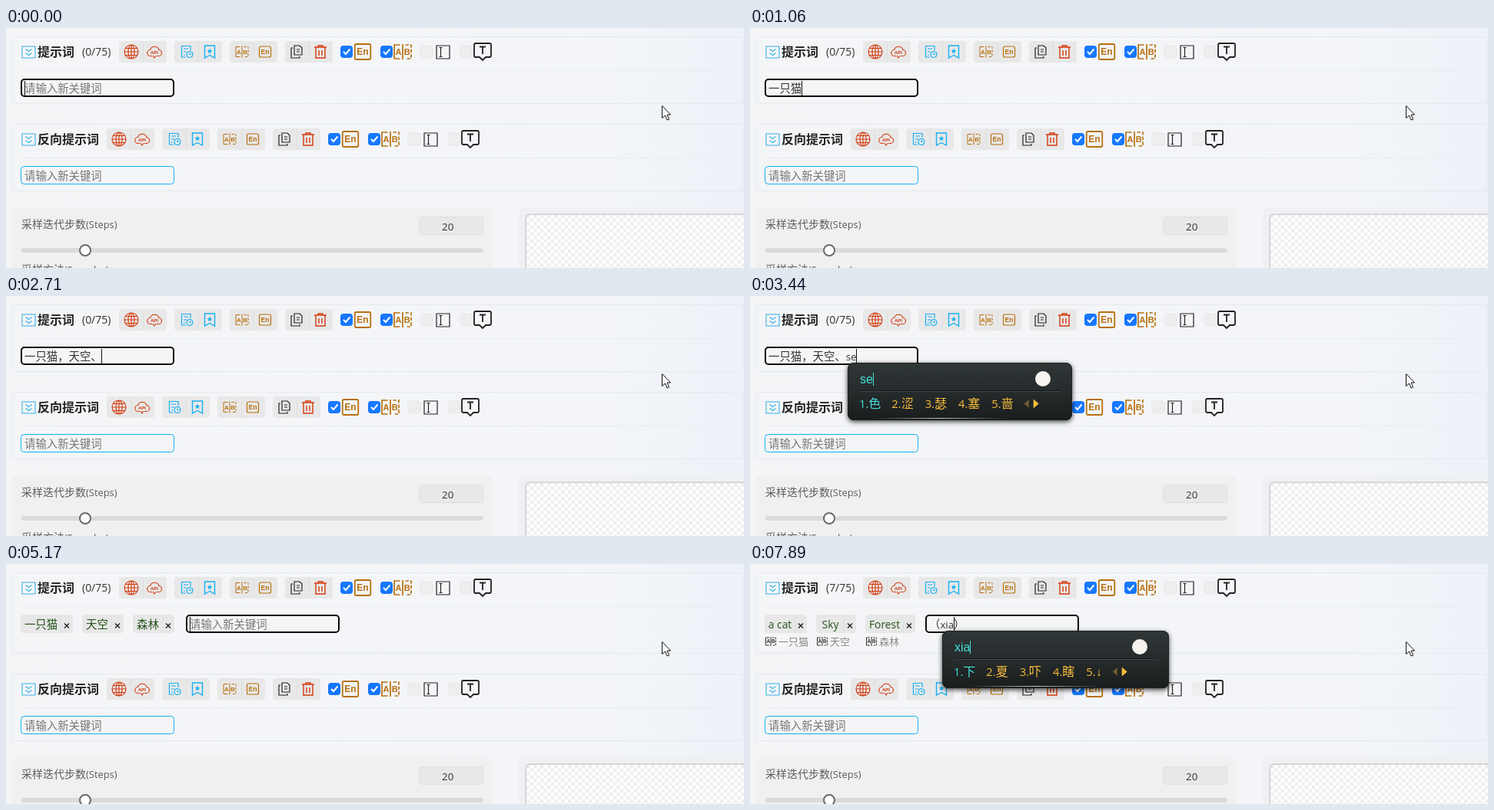
Recreate the animation shown at these times as an HTML page with a canvas. Size 960 by 313 pixels, loop 8 s.

```html
<!DOCTYPE html>
<html lang="zh-CN">
<head>
<meta charset="utf-8">
<style>
html, body { margin: 0; width: 100%; height: 100%; overflow: hidden; background: #f4f5f7; }
canvas { display: block; width: 960px; height: 313px; }
</style>
</head>
<body>
<canvas id="stage" width="960" height="313"></canvas>
<script>
const ctx = document.getElementById('stage').getContext('2d');
const LOOP = 8000, BLINK = 530, ASSIST_DELAY = 400;
const SANS = '"Open Sans", "Liberation Sans", "Noto Sans CJK SC", sans-serif';
const ARIAL = '"Liberation Sans", "Noto Sans CJK SC", sans-serif';
const RED = '#d4380d', BLUE = '#16aff2', BROWN = '#b8700f', INK = '#222', CYAN = '#45e0da', GOLD = '#f6bd3c';
const PLACEHOLDER = '请输入新关键词';

// time, text before the composition, pinyin, candidates, text after the caret
const steps = [
  [0, ''],
  [70, '', 'y', '一 有 要 也 与'],
  [170, '', 'yi', '一 以 已 亿 意'],
  [260, '', "yi'z", '一直 一只 一种 一周 一组'],
  [360, '', "yi'zh", '一直 一只 一种 一周 一张'],
  [460, '', "yi'zhi", '一直 一只 一致 意志 抑制'],
  [660, '', "yi'zhi'm", '一直忙 一只猫 一只马 一直没有 一直买'],
  [760, '', "yi'zhi'ma", '一只马 一直骂 一支马 一直麻烦 一直吗'],
  [860, '', "yi'zhi'mao", '一只猫 一直冒 一支猫 一直冒泡 一只毛'],
  [1060, '一只猫'],
  [1320, '一只猫，'],
  [1520, '一只猫，', 't', '他 她 听 天 太'],
  [1590, '一只猫，', 'ti', '提 题 体 替 踢'],
  [1690, '一只猫，', 'tia', '天 条 跳 填 挑'],
  [1790, '一只猫，', 'tian', '天 田 填 甜 添'],
  [1910, '一只猫，', "tian'k", '天空 天卡 填空 填坑 *'],
  [1980, '一只猫，', "tian'ko", '天空 填空 天口 天扣 *'],
  [2050, '一只猫，', "tian'kon", '天空 填空 天孔 天控 *'],
  [2250, '一只猫，', "tian'kong", '天空 填空 天孔 天控 *'],
  [2450, '一只猫，天空'],
  [2710, '一只猫，天空、'],
  [3240, '一只猫，天空、', 's', '是 说 上 所 三'],
  [3440, '一只猫，天空、', 'se', '色 涩 瑟 塞 啬'],
  [3510, '一只猫，天空、', 'sen', '森 森林 森林里 森林中的 森系风'],
  [3770, '一只猫，天空、', "sen'l", '森林 森立 森铃 森罗 森兰'],
  [4240, '一只猫，天空、森林'],
  [5170, ''],
  [5300, ''],
  [6230, '（）'],
  [6430, '（', '', '', '）'],
  [6960, '（', 'x', '', '）'],
  [7030, '（', 'x', '想 下 小 行 需', '）'],
  [7160, '（', 'xi', '系 洗 西 息 喜', '）'],
  [7890, '（', 'xia', '下 夏 吓 瞎 ↓', '）']
];

const shapes = {
  globe: 'M-9 0a9 9 0 1 0 18 0a9 9 0 1 0-18 0M-4 0a4 9 0 1 0 8 0a4 9 0 1 0-8 0M-9 0H9M-7.5-4.5H7.5M-7.5 4.5H7.5M0-9V9',
  cloud: 'M-3 5.5H-5A4 4 0 0 1-5.5-2.5A6 6 0 0 1 6-2.5A4 4 0 0 1 5 5.5H3M-2 5L0 8L2 5',
  doc: 'M5-2V-7.5H-6.5V7H-1M-4-4H2M-4 0H0M-4 4H-2M8 3.5a4 4 0 1 1-8 0a4 4 0 1 1 8 0M4 1.5V3.5H6',
  bookmark: 'M-6.5-8H6.5V8L0 4.5L-6.5 8Z',
  star: 'M0-5.5L1-3H3.5L1.5-1.3L2.3 1.2L0-.3L-2.3 1.2L-1.5-1.3L-3.5-3H-1Z',
  copy: 'M-3-8H4L7-5V4H-3ZM-5-5H-7V8H4V6M0-3H4M0 0H4',
  trash: 'M-8-6H8M-3-6V-8H3V-6M-6-6V8H6V-6M-2-2V5M2-2V5',
  chevrons: 'M-8.5-7.5H8.5V7.5H-8.5ZM-4-4L0-1L4-4M-4 1L0 4L4 1',
  tick: 'M-4 0L-1 3L4.5-3.5',
  textBox: 'M-8.5-8.5H8.5V8.5H-8.5ZM-5-6H-1M-3-6V6M-5 6H-1',
  bubble: 'M-9-11H9Q11-11 11-9V5Q11 7 9 7H4L0 11L-4 7H-9Q-11 7-11 5V-9Q-11-11-9-11ZM-4-6.5H4M0-6.5V3',
  pointer: 'M0 0V16L4 12.5L6.5 18.5L9 17.5L6.5 11.5H11Z'
};
for (const name in shapes) shapes[name] = new Path2D(shapes[name]);

function draw(name, x, y, stroke, width = 1.2, fill) {
  ctx.save();
  ctx.translate(x, y);
  if (fill) { ctx.fillStyle = fill; ctx.fill(shapes[name]); }
  if (stroke) { ctx.strokeStyle = stroke; ctx.lineWidth = width; ctx.stroke(shapes[name]); }
  ctx.restore();
}

function box(x, y, w, h, r, fill, stroke, width = 1) {
  ctx.beginPath();
  ctx.roundRect(x, y, w, h, r);
  if (fill) { ctx.fillStyle = fill; ctx.fill(); }
  if (stroke) { ctx.strokeStyle = stroke; ctx.lineWidth = width; ctx.stroke(); }
}

function line(x1, y1, x2, y2, color, width = 1, dash = []) {
  ctx.beginPath();
  ctx.setLineDash(dash);
  ctx.moveTo(x1, y1);
  ctx.lineTo(x2, y2);
  ctx.strokeStyle = color;
  ctx.lineWidth = width;
  ctx.stroke();
  ctx.setLineDash([]);
}

function disc(x, y, r, fill, stroke) {
  ctx.beginPath();
  ctx.arc(x, y, r, 0, Math.PI * 2);
  ctx.fillStyle = fill;
  ctx.fill();
  if (stroke) { ctx.strokeStyle = stroke; ctx.lineWidth = 2; ctx.stroke(); }
}

function triangle(x, y, dx, dy, color) {
  ctx.beginPath();
  ctx.moveTo(x, y - dy);
  ctx.lineTo(x + dx, y);
  ctx.lineTo(x, y + dy);
  ctx.fillStyle = color;
  ctx.fill();
}

// Latin runs are set a little smaller than Chinese ones; returns the end x.
function text(s, x, y, size, color, weight = 400) {
  for (const run of s.match(/[\x00-\x7f]+|[^\x00-\x7f]+/g) || []) {
    const scale = run.charCodeAt(0) < 128 ? 0.92 : 1;
    ctx.font = `${weight} ${size * scale}px ${SANS}`;
    if (color) { ctx.fillStyle = color; ctx.fillText(run, x, y); }
    x += ctx.measureText(run).width;
  }
  return x;
}
const widthOf = (s, size) => text(s, 0, 0, size);

function label(s, x, y, size, color) {
  ctx.font = `bold ${size}px ${ARIAL}`;
  ctx.fillStyle = color;
  ctx.textAlign = 'center';
  ctx.fillText(s, x, y + size * 0.36);
  ctx.textAlign = 'left';
}

function abIcon(x, y, w, h, color, width = 1) {
  const a = w / 2, b = h / 2, gap = w * 0.16;
  const half = (side, dash) => {
    ctx.beginPath();
    ctx.setLineDash(dash);
    ctx.moveTo(x + side * gap, y - b);
    ctx.lineTo(x + side * a, y - b);
    ctx.lineTo(x + side * a, y + b);
    ctx.lineTo(x + side * gap, y + b);
    ctx.strokeStyle = color;
    ctx.lineWidth = width;
    ctx.stroke();
    ctx.setLineDash([]);
  };
  half(-1, []);
  half(1, [w * 0.2, w * 0.1]);
  line(x, y - b - 1, x, y + b + 1, color, width);
  label('A', x - w * 0.25, y, w * 0.5, color);
  label('B', x + w * 0.26, y, w * 0.5, color);
}

function enIcon(x, y, w, h, size, width) {
  box(x - w / 2, y - h / 2, w, h, 2, null, BROWN, width);
  label('En', x, y, size, BROWN);
}

function checkbox(x, y, on) {
  box(x, y - 8, 16, 16, 4, on ? '#1677ff' : '#eeeeef', on ? null : '#e6e7e8');
  if (on) draw('tick', x + 8, y, '#fff', 2);
}

function toolbar(title, y, dx) {
  draw('chevrons', 29.5, y + .5, '#35b2e8', 1.1);
  text(title, 41, y + 6, 16, INK, 700);
  ctx.save();
  ctx.translate(dx, 0);
  for (let i = 0; i < 4; i++) {
    const x = 147 + i * 72;
    box(x, y - 14, 62, 28, 4, '#e8e8e8');
    line(x + 31.5, y - 14, x + 31.5, y + 14, '#dfdfdf');
  }
  draw('globe', 163, y, RED, 1.1);
  draw('cloud', 193, y, RED, 1.1);
  label('API', 193, y + .5, 6, RED);
  draw('doc', 235, y, BLUE);
  draw('bookmark', 265, y, BLUE, 1.4);
  draw('star', 265, y + 1, null, 0, BLUE);
  abIcon(307, y, 16, 13, BROWN);
  enIcon(337, y, 15, 14, 8.5, 1.2);
  draw('copy', 378, y, INK);
  draw('trash', 409, y, RED, 1.4);
  checkbox(435, y, true);
  enIcon(464, y, 20.5, 20, 12, 1.8);
  checkbox(487, y, true);
  abIcon(516, y, 22, 18, BROWN, 1.7);
  checkbox(539, y, false);
  draw('textBox', 568.5, y + .5, INK, 1.2);
  checkbox(591, y, false);
  draw('bubble', 620, y, INK, 1.8);
  ctx.restore();
}

function section(y, h) {
  box(8.5, y + .5, 950, h, 0, null, '#e5e9ed');
  line(20, y + 44.5, 949, y + 44.5, '#e2e7ea', 1, [3, 2]);
}

function settings(y) {
  box(8, y, 625, 120, 8, '#f0f0f0');
  text('采样迭代步数(Steps)', 20, y + 27, 14, '#5c5c5c');
  box(537.5, y + 12.5, 83, 23, 4, '#e8e8e8', '#dedede');
  text('20', 567, y + 30, 14.6, '#333');
  box(20, y + 53, 601, 6, 3, '#dadada');
  disc(103, y + 56, 7, '#fff', '#6c6c6c');
  text('采样方法(Sampler)', 20, y + 86, 14, '#5c5c5c');

  box(667, y, 310, 120, 8, '#eef0f3');
  box(676, y + 9, 310, 120, 6, '#fff');
  ctx.save();
  ctx.clip();
  ctx.fillStyle = '#efefef';
  const cell = 4.5;
  for (let r = 0; r < 16; r++)
    for (let c = r % 2; c < 64; c += 2) ctx.fillRect(677 + c * cell, y + 10 + r * cell, cell, cell);
  ctx.restore();
  box(676, y + 9, 310, 120, 6, null, '#d5d6d7', 2);
}

function tags(translated) {
  const names = ['一只猫', '天空', '森林'], english = ['a cat', 'Sky', 'Forest'];
  let x = 19;
  names.forEach((name, i) => {
    const word = translated ? english[i] : name, size = translated ? 15 : 14.4;
    const tw = widthOf(word, size), w = Math.max(52, Math.round(tw + 25));
    box(x, 66, w, 24, 4, '#e7e7e7');
    line(x + w - 15.5, 66, x + w - 15.5, 90, '#dedfdf');
    text(word, x + (w - 16 - tw) / 2 + .5, 84, size, '#24511a');
    const cx = x + w - 8, cy = 80.5;
    line(cx - 3, cy - 3, cx + 3, cy + 3, INK, 1.4);
    line(cx - 3, cy + 3, cx + 3, cy - 3, INK, 1.4);
    if (translated) {
      abIcon(x + 8, 101, 13, 10, '#333');
      text(name, x + 18, 105.5, 13, '#8a8a8a');
    }
    x += w + 12;
  });
}

function imePanel(x, pinyin, words, assist) {
  const pad = 14, gap = 15, top = 87;
  const items = words.map((w, i) => w === '*' ? w : `${i + 1}.${w}`);
  const itemWidth = item => item === '*' ? 42 : widthOf(item, 16);
  const listWidth = items.reduce((sum, item) => sum + itemWidth(item) + gap, 0);
  ctx.font = `16px ${ARIAL}`;
  const pinyinWidth = ctx.measureText(pinyin).width;
  const w = Math.round(Math.max(pad + listWidth + 33, 275 + pinyinWidth));

  const shade = ctx.createLinearGradient(0, top, 0, top + 75);
  shade.addColorStop(0, '#303737');
  shade.addColorStop(.5, '#262b2c');
  shade.addColorStop(1, '#1a1d1e');
  ctx.save();
  ctx.shadowColor = 'rgba(0,0,0,.75)';
  ctx.shadowBlur = 6;
  ctx.shadowOffsetY = 2;
  box(x, top, w, 75, 8, shade);
  ctx.restore();
  box(x + .5, top + .5, w - 1, 74, 8, null, '#1d2122');
  line(x + 16, 123.5, x + w - 15, 123.5, '#151819');
  line(x + 16, 124.5, x + w - 15, 124.5, '#414849');
  const glow = ctx.createLinearGradient(x + w * .12, 0, x + w * .7, 0);
  glow.addColorStop(0, 'rgba(255,255,255,0)');
  glow.addColorStop(.5, 'rgba(255,255,255,.75)');
  glow.addColorStop(1, 'rgba(255,255,255,0)');
  line(x + w * .12, 159.5, x + w * .7, 159.5, glow);

  ctx.font = `16px ${ARIAL}`;
  ctx.fillStyle = CYAN;
  ctx.fillText(pinyin, x + 16, 114);
  ctx.fillRect(Math.round(x + 16 + pinyinWidth), 100, 1, 17);
  disc(x + w - 38, 108, 10, '#f7f3ee');
  if (assist) {
    const tip = '9.打开智能写作助手';
    text(tip, x + w - 54 - widthOf(tip, 11.6), 113, 11.6, CYAN);
  }

  let cx = x + pad;
  items.forEach((item, i) => {
    if (item === '*') {
      text('5.', cx, 146, 16, GOLD);
      box(cx + 13, 129, 22, 23, 3, '#191c1d');
      ctx.fillStyle = '#8b8b80';
      ctx.beginPath();
      ctx.moveTo(cx + 36, 147);
      ctx.lineTo(cx + 43, 147);
      ctx.lineTo(cx + 39.5, 151);
      ctx.fill();
    } else {
      text(item, cx + (i ? 0 : 1), 146, 16, i ? GOLD : CYAN);
    }
    cx += itemWidth(item) + gap;
  });
  triangle(cx + 5, 140.5, -6, 5.5, '#6f5d30');
  triangle(cx + 11, 140.5, 7, 6, GOLD);
}

function render(t) {
  const [since, before, pinyin = '', words = '', after = ''] = steps.findLast(s => s[0] <= t);
  const tagged = t >= 5170, translated = t >= 5440, shift = tagged ? 18 : 0;
  const inputX = translated ? 228 : tagged ? 234 : 19;

  const bg = ctx.createLinearGradient(0, 0, 960, 0);
  bg.addColorStop(0, '#f4f5f7');
  bg.addColorStop(.82, '#f3f5f8');
  bg.addColorStop(1, '#edf1f8');
  ctx.fillStyle = bg;
  ctx.fillRect(0, 0, 960, 313);

  section(11, 87 + shift);
  toolbar('提示词', 31, 0);
  text(t >= 5500 ? '(7/75)' : '(0/75)', 99, 36, 15.2, '#333');
  if (tagged) tags(translated);

  section(125 + shift, 87);
  toolbar('反向提示词', 145 + shift, -16);
  box(19.5, 180.5 + shift, 199, 23, 4, null, BLUE);
  text(PLACEHOLDER, 24, 198 + shift, 14.4, '#757575');
  settings(234 + shift);

  box(inputX + 1, 67, 198, 22, 4, '#f4f6f5', '#0b0b0b', 2);
  const typed = before + pinyin.replaceAll("'", ''), tx = inputX + 5;
  if (!typed) text(PLACEHOLDER, tx, 84, 14.4, '#757575');
  const caret = text(typed, tx, 84, 14.4, '#333');
  text(after, caret, 84, 14.4, '#333');
  if (Math.floor((t - since) / BLINK) % 2 === 0) {
    ctx.fillStyle = '#111';
    ctx.fillRect(Math.floor(caret), 69, 1, 19);
  }
  if (words) {
    const start = Math.floor(text(before, tx, 0, 14.4));
    imePanel(start + 3, pinyin, words.split(' '), t - since >= ASSIST_DELAY);
  }
  draw('pointer', 853.5, 101.5, '#111', 1, '#fff');
}

function tick(now) {
  render(now % LOOP);
  requestAnimationFrame(tick);
}
requestAnimationFrame(tick);
</script>
</body>
</html>
```
